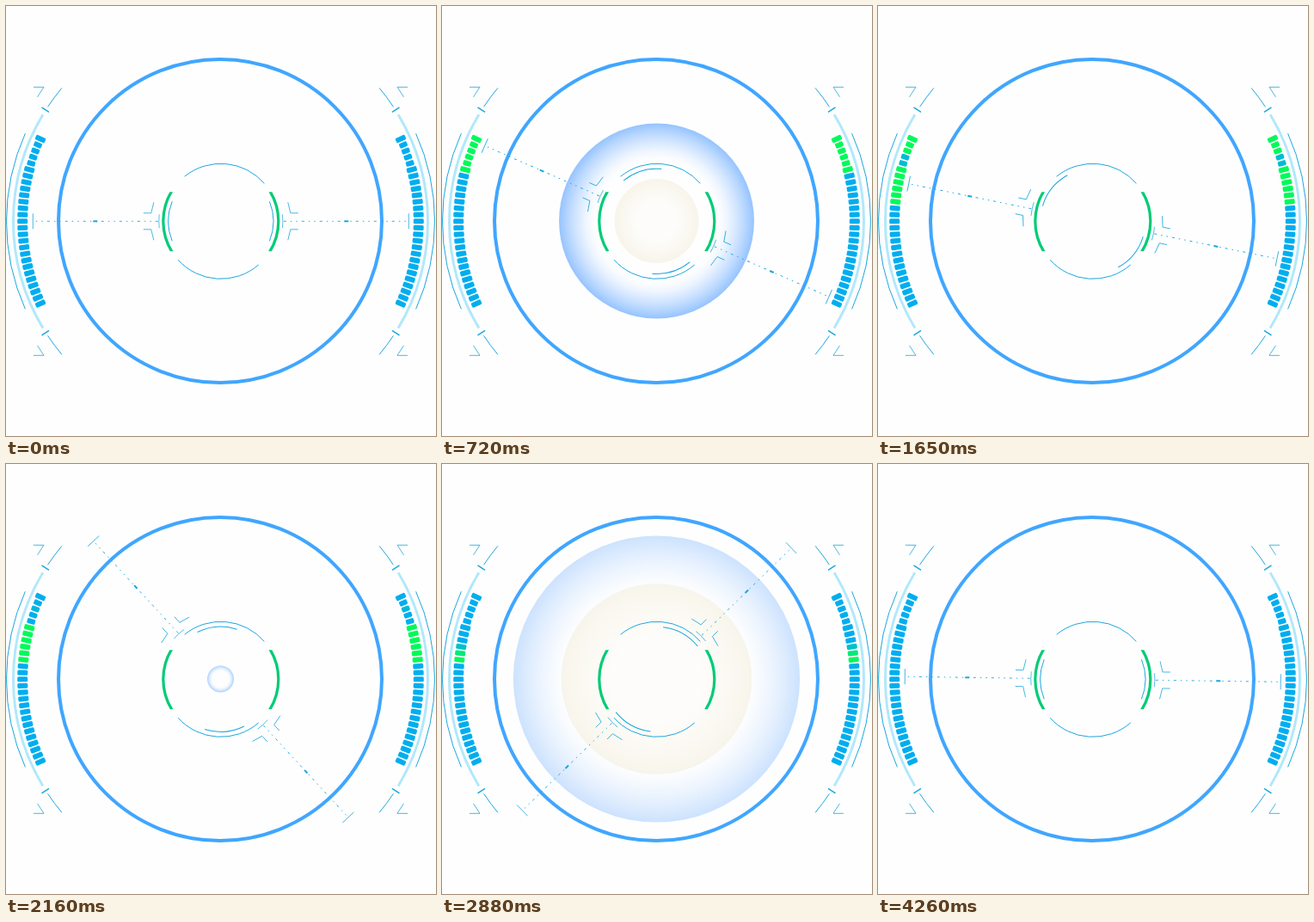
Recreate the animation shown at these times as an HTML page. Size 500 by 500 pixels, loop 4.29 s.

```html
<!DOCTYPE html>
<html lang="en">
<head>
<meta charset="utf-8">
<title>HUD scanner</title>
<style>
html, body { margin: 0; width: 100%; height: 100%; overflow: hidden; background: #fefefe; }
svg { display: block; width: 100vw; height: 100vh; }
.hair { fill: none; stroke: #1aa7df; stroke-width: 1; }
</style>
</head>
<body>
<svg viewBox="0 0 500 500">
  <defs>
    <radialGradient id="blue">
      <stop offset=".58" stop-color="#fff" stop-opacity="0"/>
      <stop offset=".78" stop-color="#d3e6ff" stop-opacity=".75"/>
      <stop offset="1" stop-color="#8fc0ff"/>
    </radialGradient>
    <radialGradient id="beige">
      <stop offset=".45" stop-color="#f4efdd" stop-opacity=".2"/>
      <stop offset="1" stop-color="#f2ecd8"/>
    </radialGradient>
    <clipPath id="band"><rect x="-80" y="-34" width="160" height="69"/></clipPath>
    <g id="arm" class="hair">
      <path d="M73 0H217" stroke-dasharray="3 5 1.5 5 1.5 5" stroke-width=".9"/>
      <path d="M143.500 0h5" stroke-width="2"/>
      <path d="M90 -9.500H81L78 -22M90 9.500H81L78 22M218.500 -9V9" stroke-width=".8"/>
      <path d="M71.600 -8A72 72 0 0 1 71.600 8" stroke-width=".7"/>
    </g>
    <path id="innerArc" class="hair" d="M56.600 -23A61 61 0 0 1 56.600 23" stroke-width=".7"/>
  </defs>
  <g id="pulses" transform="translate(249.500 250)"></g>
  <circle cx="249" cy="250" r="188" fill="none" stroke="#40a6ff" stroke-width="4"/>
  <g id="sides" transform="translate(249.500 250.300)"></g>
  <g transform="translate(249.800 250.300)">
    <path id="rim" class="hair"/>
    <circle r="67" fill="none" stroke="#00cb76" stroke-width="3.200" clip-path="url(#band)" stroke-dasharray="75 135.500" stroke-dashoffset="37.500"/>
    <g id="arms"><use href="#arm"/><use href="#arm" transform="rotate(180)"/></g>
    <g id="arcs"><use href="#innerArc"/><use href="#innerArc" transform="rotate(180)"/></g>
  </g>
</svg>
<script>
const LOOP = 4290, STEP = 30, BAR_COUNT = 27;
const $ = id => document.getElementById(id);
const clamp = x => Math.max(0, Math.min(1, x));

function add(parent, tag, attrs) {
  const el = document.createElementNS("http://www.w3.org/2000/svg", tag);
  for (const key in attrs) el.setAttribute(key, attrs[key]);
  return parent.appendChild(el);
}

// Linear interpolation through [time, value] pairs.
function track(keys, t) {
  const i = keys.findIndex(key => key[0] > t);
  if (i < 0) return keys[keys.length - 1][1];
  if (i === 0) return keys[0][1];
  const [t0, a] = keys[i - 1], [t1, b] = keys[i];
  return a + (b - a) * (t - t0) / (t1 - t0);
}

// Arc around the centre; degrees run clockwise from the right.
function arc(r, from, to) {
  const point = deg => {
    const a = deg * Math.PI / 180;
    return (r * Math.cos(a)).toFixed(2) + " " + (r * Math.sin(a)).toFixed(2);
  };
  return `M${point(from)}A${r} ${r} 0 0 1 ${point(to)}`;
}

$("rim").setAttribute("d", arc(67, 231, 319) + arc(67, 49, 138));

const bars = [];
for (const sign of [1, -1]) {
  const side = add($("sides"), "g", { transform: `scale(${sign} 1)` });
  add(side, "path", { d: arc(241, -31, 31), fill: "none", stroke: "#b1e8fb", "stroke-width": 3 });
  add(side, "path", { class: "hair", d: arc(249, -24.2, 24.2) });
  for (const flip of [1, -1]) {
    const corner = add(side, "g", { class: "hair", transform: `scale(1 ${flip})` });
    add(corner, "path", { d: arc(241, 33.5, 40) });
    add(corner, "path", { d: "M217.500 156H205.500L213 144.500", "stroke-width": .8 });
    add(corner, "path", { d: "M199.500 127L208 132.500", "stroke-width": 1.5 });
  }
  for (let i = 0; i < BAR_COUNT; i++) {
    const width = i > 0 && i < 5 ? 9.5 : 12;
    const el = add(side, "rect", {
      x: 230.3 - width / 2, y: -3, width, height: 6, rx: 1.6,
      transform: `rotate(${(i - 13) * 1.89})`
    });
    bars.push({ el, i });
  }
}

const pulses = [38, 1937].map(start => ({
  start,
  outer: add($("pulses"), "circle", { fill: "url(#blue)" }),
  inner: add($("pulses"), "circle", { fill: "url(#beige)" })
}));

const armKeys = [[0, 0], [720, 23.7], [1080, 35], [1650, 11.5], [2140, 48], [2490, 36.2],
  [2700, -55], [2880, -44.3], [3480, -23.3], [4260, .8]];
const arcKeys = [[0, 0], [720, 73], [1080, 108], [1650, 39], [2490, 116],
  [2880, 119], [3480, 105], [4260, 180]];
const blueFade = [[0, 0], [150, .7], [553, .85], [682, .95], [940, .46], [1070, .08], [1130, 0]];
const beigeFade = [[0, 0], [150, .45], [430, .55], [680, .5], [850, .15], [950, 0]];

const pulseRadius = age => 187 * (1 - Math.cos(Math.PI * clamp(age / 1200))) / 2;

function drawPulse({ start, outer, inner }, t) {
  const show = (el, age, fade) => {
    el.setAttribute("r", pulseRadius(age));
    el.setAttribute("opacity", track(fade, age));
  };
  show(outer, t - start, blueFade);
  show(inner, t - start - 272, beigeFade);
}

function barGlow(i, t) {
  if (i > 10) return 0;
  const on = i < 6 ? 200 + i * 75 : 1150 + (i - 6) * 90;
  const off = i < 3 ? 1950 + i * 60 : i < 5 ? 1570 : i === 10 ? 3250 : 2470 + (i - 5) * 115;
  return clamp((t - on) / 90) * (1 - clamp((t - off + 100) / 220));
}

function mix(a, b, k) {
  return `rgb(${a.map((v, n) => Math.round(v + (b[n] - v) * k))})`;
}

function draw(t) {
  $("arms").setAttribute("transform", `rotate(${track(armKeys, t)})`);
  $("arcs").setAttribute("transform", `rotate(${track(arcKeys, t)})`);
  pulses.forEach(pulse => drawPulse(pulse, t));
  bars.forEach(({ el, i }) =>
    el.setAttribute("fill", mix([0, 174, 239], [0, 250, 90], barGlow(i, t))));
}

let origin;
function tick(now) {
  origin ??= now;
  draw(Math.floor((now - origin) % LOOP / STEP) * STEP);
  requestAnimationFrame(tick);
}
draw(0);
requestAnimationFrame(tick);
</script>
</body>
</html>
```
